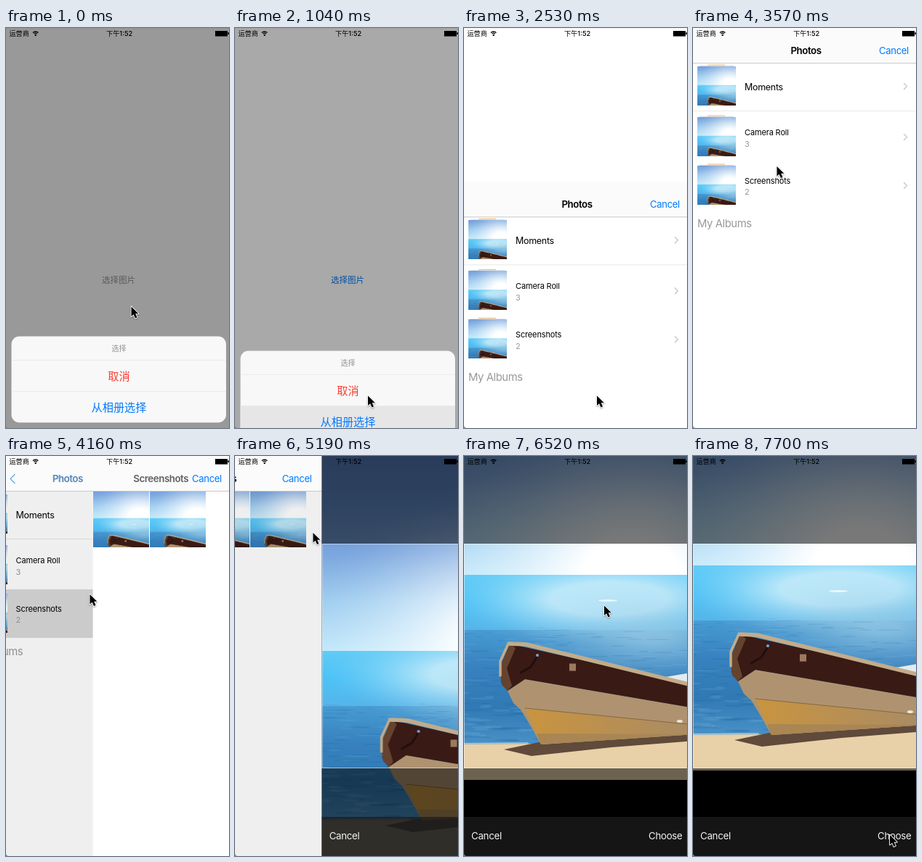
Animation, 307 px wide and 552 px high, one loop 8 s. Source, as an HTML page with a canvas:

```html
<!DOCTYPE html>
<html lang="zh">
<head>
<meta charset="utf-8">
<title>选择图片</title>
<style>
html, body { margin: 0; width: 100%; height: 100%; overflow: hidden; background: #fff; }
canvas { display: block; }
</style>
</head>
<body>
<canvas id="stage" width="307" height="552"></canvas>
<script>
const W = 311, H = 552;            // the phone screen is slightly wider than the stage
const CROP = { y: 121, size: 310 };
const HORIZON = 269;
const LOOP = 8000, STEPS = 54;
const BLUE = '#007aff', GREY = '#999';
const FONT = 'Inter, "Noto Sans CJK SC", "Noto Sans CJK", sans-serif';
let c = document.getElementById('stage').getContext('2d');

// ---- motion ----
const mix = (a, b, p) => a + (b - a) * p;

// Critically damped spring from 0 to 1
function spring(n, start) {
  const u = 1.387 * Math.max(0, n - start);
  const p = 1 - (1 + u) * Math.exp(-u);
  return p > 0.95 ? 1 : p;
}

// Cursor trips: first step, last step, destination
const HOME = [172, 384];
const TRIPS = [
  [0, 3, 182.5, 507],
  [18, 23, 115, 190.5],
  [29, 32, 107, 105.5],
  [36, 41, 234.3, 317],
  [41, 44, 192.5, 206],
  [44, 49, 262, 532],
  [49, 52, 270.5, 522.5],
];

function cursorAt(n) {
  let [x, y] = HOME;
  for (const [from, to, tx, ty] of TRIPS) {
    const p = Math.min(1, Math.max(0, (n - from) / (to - from)));
    x = mix(x, tx, p);
    y = mix(y, ty, p);
  }
  return [x, y];
}

// The picture follows the drag, then settles against the crop edge
function dragAt(n) {
  const pull = Math.min(2, Math.max(0, n - 42));
  const p = spring(n, 44);
  return [mix(-16 * pull, -30, p), mix(-52.5 * pull, -118, p)];
}

// ---- drawing helpers ----
function rect(x, y, w, h, fill) {
  c.fillStyle = fill;
  c.fillRect(x, y, w, h);
}

function text(str, x, y, size, color, { weight = 400, spacing = 0, align = 'left' } = {}) {
  c.font = `${weight} ${size}px ${FONT}`;
  c.letterSpacing = spacing + 'px';
  c.textAlign = align;
  c.fillStyle = color;
  c.fillText(str, x, y);
}

function poly(fill, ...points) {
  c.beginPath();
  points.forEach(p => c.lineTo(...p));
  c.fillStyle = fill;
  c.fill();
}

function stroke(color, width, ...points) {
  c.beginPath();
  points.forEach(p => c.lineTo(...p));
  c.strokeStyle = color;
  c.lineWidth = width;
  c.lineJoin = c.lineCap = 'round';
  c.stroke();
}

function ellipse(x, y, rx, ry, fill) {
  c.beginPath();
  c.ellipse(x, y, rx, ry, 0, 0, 7);
  c.fillStyle = fill;
  c.fill();
}

function shifted(dx, dy, draw) {
  c.save();
  c.translate(dx, dy);
  draw();
  c.restore();
}

function fade(y, h, ...colors) {
  const g = c.createLinearGradient(0, y, 0, y + h);
  colors.forEach((color, i) => g.addColorStop(i / (colors.length - 1), color));
  rect(0, y, 360, h, g);
}

// Soft elliptical light, opaque up to `core` of its radius
function glow(x, y, rx, ry, rgb, alpha, core) {
  shifted(x, y, () => {
    c.scale(rx, ry);
    const g = c.createRadialGradient(0, 0, 0, 0, 0, 1);
    for (let i = 0; i <= 8; i++) {
      const p = i / 8;
      g.addColorStop(mix(core, 1, p), `rgba(${rgb},${alpha * (1 - p) ** 1.6})`);
    }
    ellipse(0, 0, 1, 1, g);
  });
}

// ---- seaside picture, painted once ----
function paintSky() {
  fade(0, HORIZON, '#5780c3', '#628fcd', '#7ba6de', '#a0cef0', '#c2e8fa');
  glow(262, HORIZON, 290, 235, '255,255,255', 1, 0.22);
}

function paintSea() {
  c.save();
  c.beginPath();
  c.rect(0, HORIZON, 360, H - HORIZON);
  c.clip();
  fade(HORIZON, 76, '#62cbf6', '#4dc2f6', '#55b5ea');
  fade(345, 160, '#479bd3', '#3781be', '#3079b4', '#4a92c7');
  glow(232, 302, 230, 66, '188,232,249', 1, 0.35);
  glow(290, 355, 230, 80, '150,200,228', 0.75, 0.1);

  let seed = 7;
  const rnd = () => (seed = seed * 16807 % 2147483647) / 2147483647;
  for (let i = 0; i < 320; i++) {
    const depth = rnd();
    const shade = rnd() < 0.5 ? '25,95,155' : '140,200,232';
    ellipse(rnd() * 350, 342 + depth * 158, 5 + rnd() * 14, 0.5 + depth * 1.2, `rgba(${shade},.16)`);
  }
  ellipse(230, 304.5, 13, 1.5, 'rgba(255,255,255,.75)');
  c.restore();
}

function paintSand() {
  poly('#e8d0a8', [0, 503], [130, 502], [360, 490], [360, H], [0, H]);
  stroke('rgba(225,238,240,.6)', 1.5, [0, 502], [120, 501]);
}

// Hull lines run from the bow to a stern beyond the right edge
function paintBoat() {
  const STERN = 320;
  const tip = [65, 246], chine = [86, 295], stem = [62, 311], heel = [108, 385];
  const rimEnd = [STERN, 304], chineEnd = [STERN, 335], stripeEnd = [STERN, 358], keelEnd = [STERN, 371];

  poly('#5f4a3b', [57, 392], [110, 381], keelEnd, [STERN, 380], [205, 389], [95, 401]);
  poly('#e3ebee', [262, 295], [STERN, 285], rimEnd);

  poly('#af9370', stem, chine, chineEnd, keelEnd, heel, [91, 355], [80, 337], [70, 328]);
  const gold = c.createLinearGradient(90, 0, STERN, 0);
  gold.addColorStop(0, '#c8943f');
  gold.addColorStop(1, '#a98b66');
  poly(gold, [86, 335], stripeEnd, keelEnd, heel);
  poly('#a98654', [102, 370], keelEnd, heel);
  stroke('#856740', 1, [86, 335], stripeEnd);

  poly('#3a1a14', tip, rimEnd, chineEnd, chine, stem, [54, 302], [51, 280]);
  poly('#66432f', tip, [73, 252], [61, 280], [68, 304], stem, [54, 302], [51, 280]);
  stroke('#20100f', 3, [102, 265], [94, 278], [80, 286]);
  stroke('#c2ac8b', 3.5, [52, 290], [52, 270], [63, 246]);
  stroke('#c2ac8b', 5.5, [64, 246], [88, 247], rimEnd);
  ellipse(103, 262, 2, 2, '#7fa0d8');
  rect(147, 273.5, 9, 10, '#9c7a62');
  ellipse(299, 353, 4, 2, '#efe6d5');
}

function paintPicture() {
  const canvas = document.createElement('canvas');
  canvas.width = 350;
  canvas.height = H;
  const main = c;
  c = canvas.getContext('2d');
  paintSky();
  paintSea();
  paintSand();
  shifted(30, 118, paintBoat);
  c = main;
  return canvas;
}

const picture = paintPicture();

function thumb(x, y, w, h = w) {
  c.imageSmoothingQuality = 'high';
  c.drawImage(picture, 0, CROP.y, CROP.size, CROP.size, x, y, w, h);
}

// ---- screens ----
function statusBar() {
  text('运营商', 4.5, 11, 9.1, '#000');
  text('下午1:52', 138, 11, 9.2, '#000', { weight: 500 });
  c.strokeStyle = '#000';
  c.lineCap = 'butt';
  c.lineWidth = 1.3;
  for (const r of [3.1, 5.3]) {
    c.beginPath();
    c.arc(40.7, 10.3, r, -2.36, -0.78);
    c.stroke();
  }
  ellipse(40.7, 9.9, 1.2, 1.1, '#000');
  rect(288, 4, 17, 7.5, '#000');
  rect(305.5, 6, 1.5, 3, '#000');
}

function homeScreen(n) {
  const p = spring(n, 6.5);
  rect(0, 0, W, H, '#fff');
  rect(0, 0, W, 2, '#f7f7f7');
  text('选择图片', 132, 351.5, 11.5, p > 0 ? BLUE : '#979797');
  if (p === 1) return;
  rect(0, 0, W, H, `rgba(0,0,0,${0.4 * (1 - p)})`);
  shifted(0, p * 130, () => actionSheet(n >= 5 && n < 8));
}

function actionSheet(pressed) {
  const middle = W / 2;
  const center = { align: 'center' };
  c.save();
  c.beginPath();
  c.roundRect(7.5, 425.5, 295.5, 119, 11);
  c.clip();
  rect(0, 420, W, 130, '#f8f8f8');
  if (pressed) rect(0, 502, W, 50, '#e6e6e6');
  for (const y of [458, 501]) rect(0, y, W, 1, '#ebebeb');
  text('选择', middle, 446, 10, '#8f8f8f', center);
  text('取消', middle, 485.7, 15.2, '#ff3b30', center);
  text('从相册选择', middle, 528.7, 15.2, BLUE, center);
  c.restore();
}

function chevron(x, y, dir, color, s = 4) {
  stroke(color, 1.4, [x, y - s], [x + dir * s, y], [x, y + s]);
}

function albumRow(name, y, size, baseline, count) {
  rect(20, y - 1.5, 24, 1, '#f0b56c');
  rect(9, y, 47, 1, '#c9d3e4');
  thumb(6, y + 1, 53, 54);
  text(name, 71, baseline, size, '#000', { spacing: size > 12 ? -0.3 : -0.15 });
  if (count) text(count, 71, baseline + 15.7, 11, GREY);
  chevron(290.5, y + 28.5, 1, '#c7c7cc');
}

function albumList(pressed) {
  rect(0, 48, W, H, '#fff');
  if (pressed) rect(0, 184, W, 67, '#d9d9d9');
  albumRow('Moments', 52, 12.5, 85.5);
  rect(0, 114, W, 1, '#e9e9e9');
  albumRow('Camera Roll', 122, 11, 148, '3');
  albumRow('Screenshots', 189, 11, 214.5, '2');
  text('My Albums', 6, 275, 14.8, GREY, { spacing: -0.4 });
}

function photoGrid() {
  rect(0, 48, W, H, '#fff');
  thumb(0, 49, 77);
  thumb(78, 49, 77);
}

function navBar(push) {
  const middle = W / 2, back = 115;
  const title = { weight: 600, spacing: -0.45, align: 'center' };
  rect(0, 0, W, 48, '#fbfbfb');
  rect(0, 48, W, 1, '#c9c9c9');
  c.save();
  c.globalAlpha = 1 - push;
  text('Photos', middle - back * push, 36, 13.3, '#000', title);
  c.globalAlpha = push;
  text('Screenshots', middle + 150 * (1 - push), 36, 13.3, '#000', title);
  chevron(12, 31.5, -1, BLUE, 6);
  text('Photos', 20 + back * (1 - push), 36, 13.3, BLUE, { spacing: -0.3 });
  c.restore();
  text('Cancel', 256, 36, 13.2, BLUE, { spacing: -0.4 });
}

// Slides `under` back and dims it while a page comes in from the right
function pushPage(p, under) {
  if (p === 1) return;
  shifted(-0.3 * W * p, 0, under);
  rect(0, 48, W, H, `rgba(0,0,0,${0.1 * p})`);
}

function cropScreen(n) {
  const bottom = CROP.y + CROP.size;
  const shade = 'rgba(0,0,0,.53)';
  rect(0, 0, W, H, '#000');
  c.drawImage(picture, ...dragAt(n));
  rect(0, 0, W, CROP.y, shade);
  rect(0, bottom, W, H - bottom, shade);
  c.strokeStyle = 'rgba(255,255,255,.5)';
  c.lineWidth = 1;
  c.strokeRect(0.5, CROP.y + 0.5, W - 1, CROP.size - 1);
  rect(0, 498, W, 54, 'rgba(29,29,29,.75)');
  text('Cancel', 10, 529, 13.3, '#f4f4f4', { spacing: -0.3 });
  text('Choose', 254, 529, 13.3, '#f4f4f4', { spacing: -0.3 });
}

function library(n) {
  const rise = spring(n, 15.5), toGrid = spring(n, 26.5), toCrop = spring(n, 33.5);
  if (!rise) return;
  shifted(0, H * (1 - rise), () => {
    pushPage(toCrop, () => {
      pushPage(toGrid, () => albumList(n >= 26));
      shifted(W * (1 - toGrid), 0, photoGrid);
    });
    shifted(-W * toCrop, 0, () => navBar(toGrid));
    shifted(W * (1 - toCrop), 0, () => cropScreen(n));
  });
}

function cursor(n) {
  const arrow = [[0.5, 0.5], [0.5, 14], [3.6, 11.2], [6, 16.6], [8.5, 15.5], [6.2, 10.3], [10.4, 10.3]];
  shifted(...cursorAt(n), () => {
    c.shadowColor = 'rgba(0,0,0,.35)';
    c.shadowBlur = 2;
    c.shadowOffsetY = 1;
    stroke('#fff', 1.8, ...arrow, arrow[0]);
    c.shadowColor = 'transparent';
    poly('#000', ...arrow);
  });
}

function windowCorner() {
  c.beginPath();
  c.moveTo(0, H - 4);
  c.quadraticCurveTo(0, H, 4, H);
  c.lineTo(0, H);
  c.fillStyle = '#8b8470';
  c.fill();
}

const start = performance.now();

function frame() {
  const t = (performance.now() - start) % LOOP;
  const n = Math.min(STEPS - 1, Math.floor((t + 6) * STEPS / LOOP));
  homeScreen(n);
  library(n);
  statusBar();
  windowCorner();
  cursor(n);
  requestAnimationFrame(frame);
}

frame();
</script>
</body>
</html>
```
